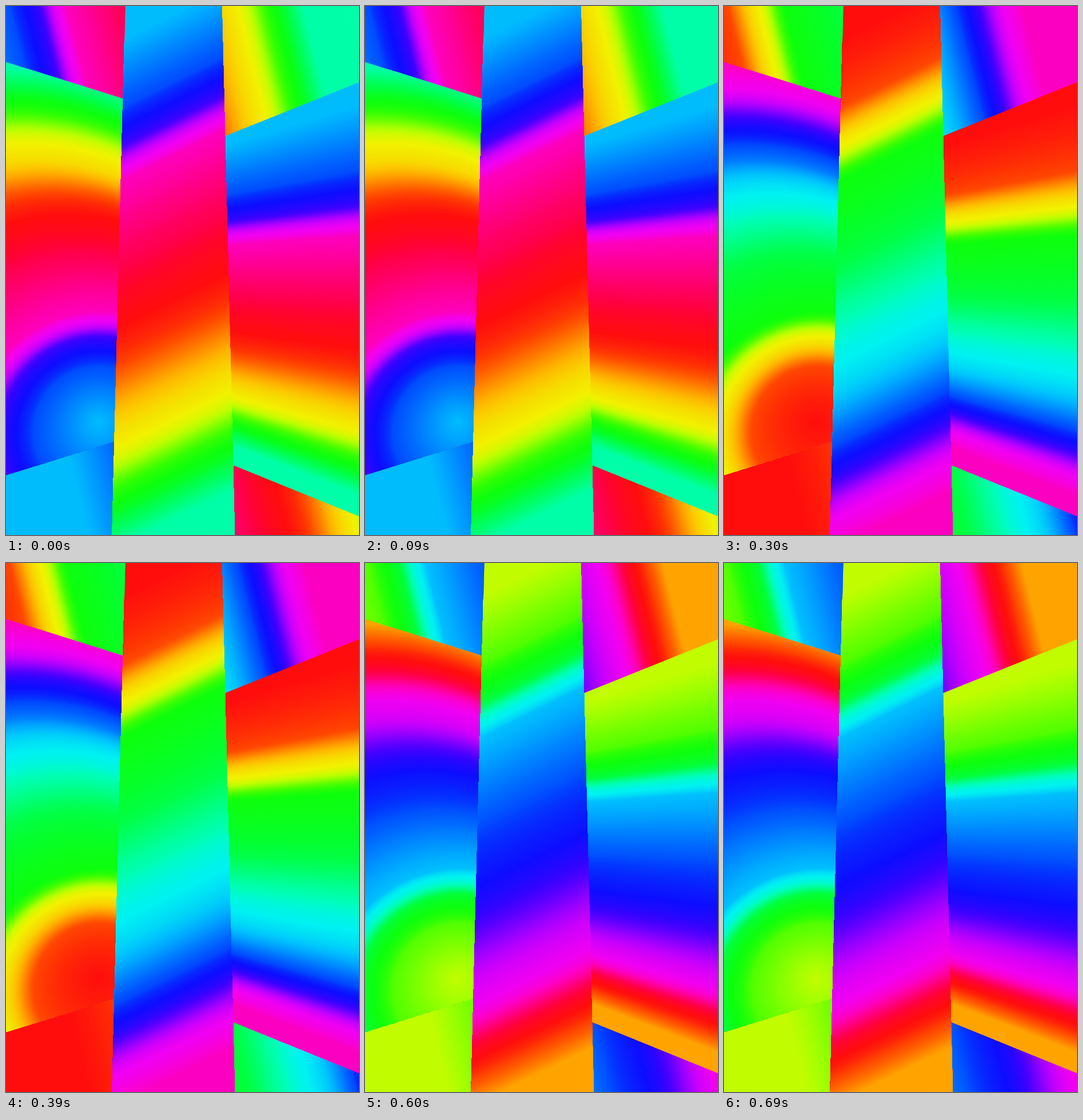
These frames come from a looping animation (611x917 px, 750 ms). An HTML page with a canvas:

```html
<!DOCTYPE html>
<html lang="en">
<head>
<meta charset="utf-8">
<style>
  html, body { margin: 0; width: 100%; height: 100%; overflow: hidden; }
  canvas { display: block; }
</style>
</head>
<body>
<canvas id="stage" width="611" height="917"></canvas>
<script>
const ctx = document.getElementById('stage').getContext('2d');
const W = 611, H = 917;
const STEP_MS = 150;
const BASE_HUES = [199, 276, 360, 400, 438];
const BANDS = 700;
const FAR = 2000;

// Hue shift along every gradient: two steep rises between slow stretches.
const HUE_PROFILE = [[0, 0], [0.17, 20], [0.26, 60], [0.335, 120], [0.51, 140],
  [0.62, 160], [0.835, 220], [0.955, 300], [1, 318]];

// Circles along the arched gradient: position, centre x, centre y, radius.
const ARCH = [[0, 160, 720, 0], [0.34, 165, 757, 230], [0.63, 105, 705, 347],
  [0.8, 50, 668, 400], [1, -20, 655, 550]];

const mix = (a, b, t) => a + (b - a) * t;

function sample(stops, t) {
  const i = Math.max(1, stops.findIndex(stop => stop[0] >= t));
  const a = stops[i - 1], b = stops[i];
  const local = (t - a[0]) / (b[0] - a[0]);
  return a.slice(1).map((v, k) => mix(v, b[k + 1], local));
}

function tracePolygon(points) {
  ctx.beginPath();
  points.forEach(([x, y]) => ctx.lineTo(x, y));
  ctx.closePath();
}

// Area below a line that moves from `start` to `end`, each [left y, right y].
function sweepDown(x0, x1, start, end, bend = 0) {
  return t => {
    const s = t - bend * t * (1 - t);
    const left = mix(start[0], end[0], s), right = mix(start[1], end[1], s);
    tracePolygon([[x0, left], [x1, right], [x1, FAR], [x0, FAR]]);
  };
}

// Area right of a leaning line whose x at height y0 runs from x0 to x1.
function sweepRight(y0, x0, x1, lean = 0.25) {
  return t => {
    const x = mix(x0, x1, t);
    const at = y => x + lean * (y - y0);
    tracePolygon([[at(0), 0], [FAR, 0], [FAR, H], [at(H), H]]);
  };
}

// Area inside a circle that shrinks onto its focus.
function arch(t) {
  const [x, y, radius] = sample(ARCH, t);
  ctx.beginPath();
  ctx.arc(x, y, radius, 0, Math.PI * 2);
}

const box = (x0, y0, x1, y1) => [[x0, y0], [x1, y0], [x1, y1], [x0, y1]];

// Painted in order; later panels cover the rims of earlier ones.
const panels = [
  { shape: box(0, 0, 212, 170), trace: sweepRight(0, -97, 503) },
  { shape: box(370, 0, W, 235), trace: sweepRight(0, -185, 515) },
  { shape: box(0, 750, 200, H), trace: sweepRight(750, 100, 750) },
  { shape: box(385, 790, W, H), trace: sweepRight(800, 110, 670) },
  { shape: [[0, 97], [212, 164], [212, 747], [0, 813]], trace: arch, inward: true },
  { shape: [[370, 229], [W, 132], [W, 884], [370, 786]],
    trace: sweepDown(379, W, [240, 170], [758, 848]) },
  { shape: [[206.5, 0], [373.5, 0], [396, H], [183.5, H]],
    trace: sweepDown(183, 397, [66, -41], [942, 837], 0.25) }
];

// Hue lingers at the primaries and secondaries; secondaries are a little darker.
function color(hue) {
  const rad = hue * Math.PI / 180;
  const eased = hue - 4 * Math.sin(6 * rad);
  const light = 50 + 2.5 * Math.cos(3 * rad) ** 3;
  return `hsl(${eased % 360}, 100%, ${light}%)`;
}

function paintPanel({ shape, trace, inward }, baseHue) {
  ctx.save();
  tracePolygon(shape);
  ctx.clip();
  for (let i = 0; i <= BANDS; i++) {
    const t = inward ? 1 - i / BANDS : i / BANDS;
    ctx.fillStyle = color(baseHue + sample(HUE_PROFILE, t)[0]);
    if (i === 0) tracePolygon(shape);
    else trace(t);
    ctx.fill();
  }
  ctx.restore();
}

let shown = -1;
function draw(now) {
  const step = Math.floor(now / STEP_MS) % BASE_HUES.length;
  if (step === shown) return;
  shown = step;
  panels.forEach(panel => paintPanel(panel, BASE_HUES[step]));
}

const start = performance.now();
function tick() {
  draw(performance.now() - start);
  requestAnimationFrame(tick);
}
tick();
</script>
</body>
</html>
```
